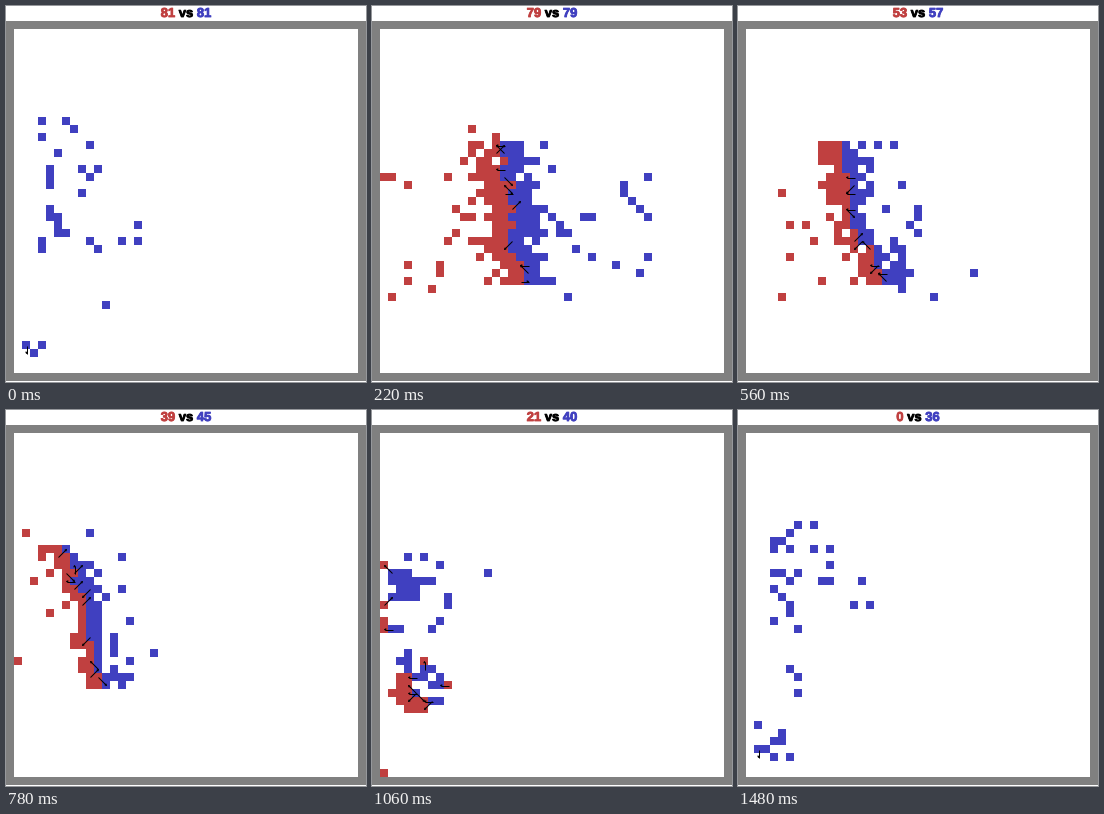
A matplotlib script that plays this animation: 360 by 376 pixels, repeating every 1500 ms.

```python
import math
import random

import matplotlib.pyplot as plt
import numpy as np
from matplotlib import patheffects
from matplotlib.animation import FuncAnimation
from matplotlib.collections import LineCollection
from matplotlib.patches import Rectangle

W, H, DPI = 360, 376, 100
CELL, GRID, LEFT, TOP = 8, 43, 8, 23
SLOTS, STEP_MS = 75, 20
RED, BLUE = (192, 64, 64), (64, 64, 192)
FONT_PX = 13
DIGIT = 0.556 * FONT_PX
SPACE = 0.278 * FONT_PX
HOLDS = {1, 4, 7, 12, 15, 19, 23, 40, 49, 58, 64, 67, 71}
MAX_ARROWS = 12
CORNER = (1, 40)


def weighted_pick(weights, n, rng):
    """Draw n cells without repeats, heavier ones first."""
    order = {c: rng.expovariate(1) / w for c, w in weights.items()}
    return sorted(order, key=order.get)[:n]


def clash(front, n_red, n_blue, reach_red, reach_blue, seed):
    """Two armies pressed against a front of (row, column) points.

    Both are dense at the line and thin out into loose stragglers.
    """
    rng = random.Random(seed)
    rows, cols = zip(*front)
    red, blue = {}, {}
    for y in range(rows[0] - 2, rows[-1] + 3):
        edge = round(np.interp(y, rows, cols) + rng.uniform(-0.6, 0.6))
        in_line = rows[0] <= y <= rows[-1]
        for side, reach, step, x0 in ((red, reach_red, -1, edge - 1),
                                      (blue, reach_blue, 1, edge)):
            for d in range(reach):
                x = x0 + step * d
                if not 0 <= x < GRID:
                    break
                weight = math.exp(-d) * in_line + 0.01
                if d > 2 and (x + y) % 2:
                    weight *= 0.4
                side[x, y] = weight
    return weighted_pick(red, n_red, rng), weighted_pick(blue, n_blue, rng)


def camps(red, blue, seed):
    """Units strewn over boxes (x, y, w, h, count)."""
    rng, taken, teams = random.Random(seed), set(), []
    for boxes in (red, blue):
        units = []
        for x, y, w, h, n in boxes:
            free = [(i, j) for j in range(y, y + h) for i in range(x, x + w)
                    if (i, j) not in taken]
            cells = rng.sample(free, n)
            units += cells
            taken.update(cells)
        teams.append(units)
    return teams


def tracks(old, new, seed):
    """Pair each unit with its next place; the unpaired ones fall."""
    rng = random.Random(seed)
    pairs = sorted((math.dist(a, b), i, j) for i, a in enumerate(old)
                   for j, b in enumerate(new))
    goal, used = {}, set()
    for _, i, j in pairs:
        if i not in goal and j not in used:
            goal[i] = new[j]
            used.add(j)
    fallen = [i for i in range(len(old)) if i not in goal]
    rng.shuffle(fallen)
    end = {i: (k + 1) / (len(fallen) + 1) for k, i in enumerate(fallen)}
    return [(a, goal.get(i, a), end.get(i, 2)) for i, a in enumerate(old)]


last_round = camps([], [(3, 11, 8, 17, 23), (12, 24, 4, 3, 3),
                        (11, 34, 1, 1, 1), (1, 39, 3, 2, 3)], 1)
line_up = camps([(0, 9, 13, 26, 81)], [(25, 8, 16, 25, 81)], 2)
first_contact = clash([(14, 15), (20, 16.5), (26, 16), (31, 18)],
                      79, 79, 17, 20, 3)
push = clash([(14, 12), (20, 13), (25, 14), (31, 17)], 53, 57, 16, 12, 4)
retreat = clash([(14, 5.5), (18, 7.5), (22, 9), (31, 11)], 39, 45, 11, 8, 5)
split = camps([(2, 30, 2, 4, 8), (3, 33, 3, 2, 5), (0, 15, 1, 11, 4),
               (1, 27, 8, 9, 3), (0, 42, 1, 1, 1)],
              [(1, 17, 4, 4, 14), (0, 15, 9, 10, 11), (13, 17, 1, 1, 1),
               (2, 27, 4, 3, 5), (4, 29, 4, 5, 9)], 6)
cornered = camps([(0, 30, 1, 3, 3), (1, 33, 2, 2, 3), (3, 35, 1, 1, 1),
                  (2, 37, 2, 1, 2), (0, 42, 1, 1, 1)],
                 [(1, 13, 11, 11, 21), (11, 17, 6, 3, 2), (1, 29, 3, 4, 7),
                  (2, 33, 4, 3, 6)], 7)
victory = camps([], [(3, 11, 8, 14, 22), (12, 16, 5, 6, 3), (3, 29, 4, 6, 3),
                     (1, 36, 5, 5, 8)], 8)

KEYS = [2, 11, 28, 39, 53, 62, 74]
POSES = [line_up, first_contact, push, retreat, split, cornered, victory]
PARTS = [[tracks(a[t], b[t], 10 * k + t) for t in (0, 1)]
         for k, (a, b) in enumerate(zip(POSES, POSES[1:]))]
NEARBY = sorted(((i, j) for i in range(-4, 5) for j in range(-4, 5)),
                key=lambda d: math.hypot(*d))


def clamp(v):
    return min(max(v, 0), GRID - 1)


def settle(x, y, taken):
    """Nearest free cell to the wanted one."""
    for dx, dy in NEARBY:
        cell = clamp(x + dx), clamp(y + dy)
        if cell not in taken:
            break
    taken.add(cell)
    return cell


def armies(slot):
    k = max(i for i in range(len(KEYS) - 1) if KEYS[i] <= slot)
    u = (slot - KEYS[k]) / (KEYS[k + 1] - KEYS[k])
    rng, taken = random.Random(slot), set()
    shake = 0.35 * math.sin(math.pi * u) if 0 < u < 1 else 0
    result = []
    for team in PARTS[k]:
        units = []
        for (x0, y0), (x1, y1), end in team:
            if u >= end:
                continue
            x, y = round(x0 + (x1 - x0) * u), round(y0 + (y1 - y0) * u)
            if rng.random() < shake:
                x, y = x + rng.randint(-1, 1), y + rng.randint(-1, 1)
            units.append(settle(x, y, taken))
        result.append(units)
    return result


def strikes(red, blue, slot):
    """Arrows between neighbouring enemies, or into the conquered corner."""
    if not red:
        others = [b for b in blue if b != CORNER]
        return [(min(others, key=lambda b: math.dist(b, CORNER)), CORNER)]
    rng = random.Random(100 + slot)
    pairs = [(r, b) for r in red for b in blue
             if max(abs(r[0] - b[0]), abs(r[1] - b[1])) == 1]
    pairs = rng.sample(pairs, min(MAX_ARROWS, len(pairs)))
    return [p if rng.random() < 0.5 else p[::-1] for p in pairs]


def centre(cell):
    return LEFT + CELL * cell[0] + 4.5, TOP + CELL * cell[1] + 4.5


def arrow(a, b):
    (x0, y0), (x1, y1) = centre(a), centre(b)
    back = math.atan2(y0 - y1, x0 - x1)
    wings = [(x1 + 2 * math.cos(back + s), y1 + 2 * math.sin(back + s))
             for s in (-0.4, 0.4)]
    return [[(x0, y0), (x1, y1)], [wings[0], (x1, y1), wings[1]]]


fig = plt.figure(figsize=(W / DPI, H / DPI), dpi=DPI, facecolor="white")
ax = fig.add_axes([0, 0, 1, 1])
ax.axis("off")
ax.add_patch(Rectangle((0, 15), 360, 360, color="#808080", lw=0))
field = ax.imshow(np.full((GRID, GRID, 3), 255, np.uint8), aspect="auto",
                  extent=(LEFT, LEFT + CELL * GRID, TOP + CELL * GRID, TOP),
                  interpolation="nearest", zorder=2)
lines = LineCollection([], colors="black", linewidths=72 / DPI, zorder=3)
ax.add_collection(lines)
ax.set_xlim(0, W)
ax.set_ylim(H, 0)


def label(colour):
    c = tuple(v / 255 for v in colour)
    return ax.text(0, 11, "", color=c, family="Liberation Sans",
                   weight="bold", size=FONT_PX * 72 / DPI, va="baseline",
                   path_effects=[patheffects.withStroke(linewidth=0.6,
                                                        foreground=c)])


labels = [label(c) for c in (RED, (0, 0, 0), BLUE)]


def set_score(red, blue):
    words = [str(red), "vs", str(blue)]
    x = W / 2 - (sum(map(len, words)) * DIGIT + 2 * SPACE) / 2
    for text, word in zip(labels, words):
        text.set_text(word)
        text.set_x(x)
        x += len(word) * DIGIT + SPACE


def draw(slot):
    while slot in HOLDS:
        slot -= 1
    if slot < KEYS[0]:
        red, blue = last_round
        set_score(*map(len, line_up))
    else:
        red, blue = armies(slot)
        set_score(len(red), len(blue))
    img = np.full((GRID, GRID, 3), 255, np.uint8)
    for units, colour in ((red, RED), (blue, BLUE)):
        for x, y in units:
            img[y, x] = colour
    field.set_data(img)
    lines.set_segments([s for a, b in strikes(red, blue, slot)
                        for s in arrow(a, b)])
    return [field, lines, *labels]


anim = FuncAnimation(fig, draw, frames=SLOTS, interval=STEP_MS, repeat=True,
                     repeat_delay=0, blit=False)
plt.show()
```
